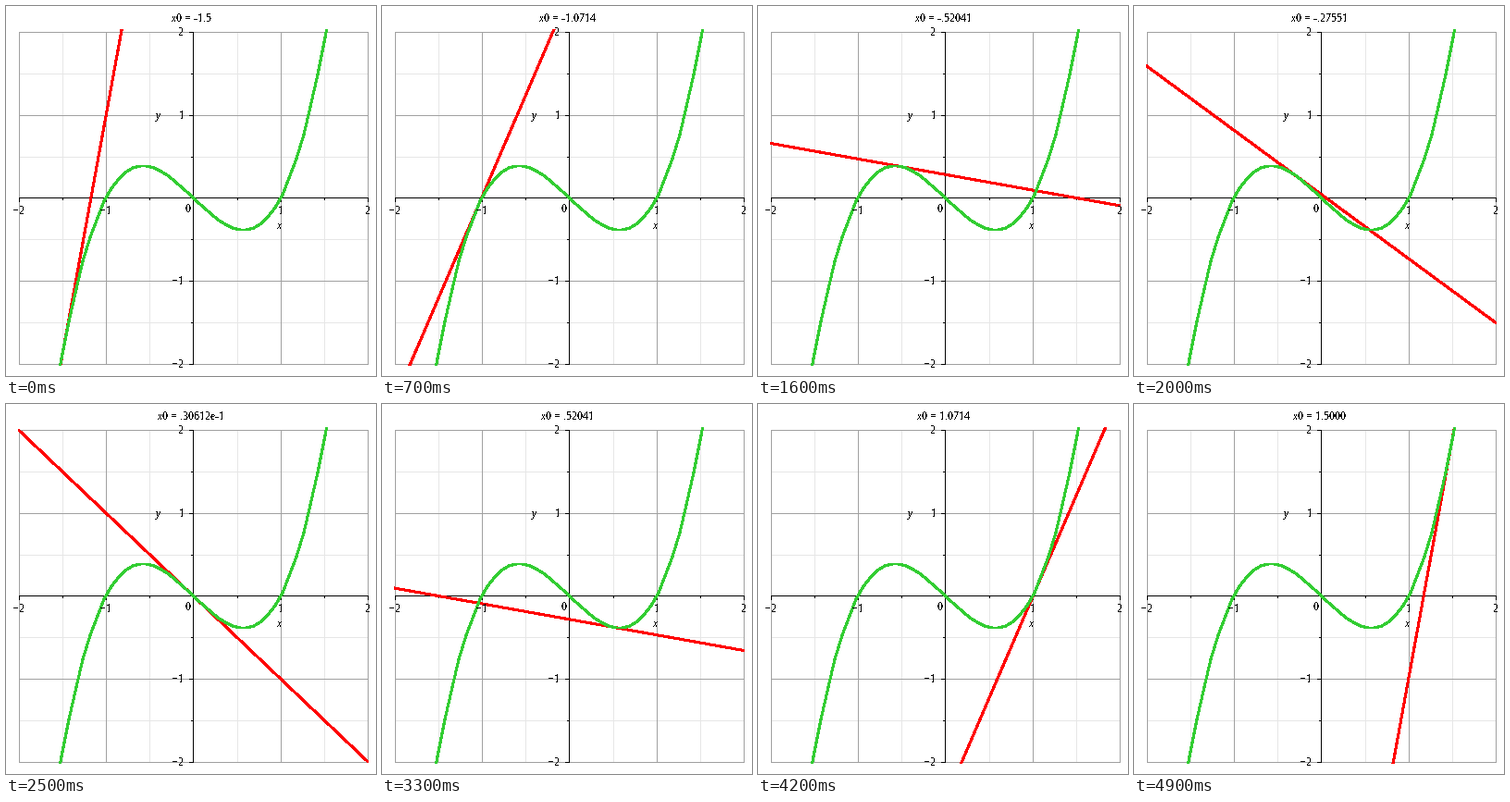
Recreate the animation shown at these times as a matplotlib script. Size 400x400 px, loop 5000 ms.

```python
import numpy as np
import matplotlib.pyplot as plt
from matplotlib.animation import FuncAnimation
from matplotlib.patches import Rectangle

SIZE, DPI, FRAMES = 400, 100, 50
PX = 72 / DPI  # points per pixel
LEFT, RIGHT, TOP, BOTTOM = 14, 391, 28, 387
GREEN, RED = "#32cd32", "#ff0000"

plt.rcParams.update({
    "font.family": "Liberation Serif",
    "text.antialiased": False,
    "text.hinting": "native",
    "text.hinting_factor": 1,
})

fig = plt.figure(figsize=(SIZE / DPI, SIZE / DPI), dpi=DPI, facecolor="white")
ax = fig.add_axes([0, 0, 1, 1])
ax.set_xlim(0, SIZE)
ax.set_ylim(SIZE, 0)
ax.axis("off")


def to_px(x):
    return LEFT + (np.asarray(x) + 2) * (RIGHT - LEFT) / 4


def to_py(y):
    return BOTTOM - (np.asarray(y) + 2) * (BOTTOM - TOP) / 4


def column(x):
    return np.ceil(to_px(x) - 0.5)


def row(y):
    return np.ceil(to_py(y) - 0.5)


def hairline(x0, y0, x1, y1, color):
    """One-pixel line covering both end pixels."""
    ax.plot([x0 + 0.5, x1 + 0.5], [y0 + 0.5, y1 + 0.5], color=color, lw=PX,
            snap=False, solid_capstyle="projecting")


def label(x, y, text, ha="center", **kw):
    return ax.text(x, y, text, fontsize=12 * PX, ha=ha, va="baseline",
                   zorder=5, **kw)


def f(x):
    return x ** 3 - x


# Grid: minor lines first, then unit lines
halves = np.arange(-2, 2.1, 0.5)
for ticks, color in ((halves[1::2], "#e6e6e6"), (halves[::2], "#a0a0a0")):
    for t in ticks:
        hairline(column(t), TOP, column(t), BOTTOM, color)
        hairline(LEFT, row(t), RIGHT, row(t), color)

# Axes with ticks
axis_x, axis_y = column(0), row(0)
hairline(axis_x, TOP, axis_x, BOTTOM, "black")
hairline(LEFT, axis_y, RIGHT, axis_y, "black")
for t in halves:
    size = 4 if t == int(t) else 2
    hairline(column(t), axis_y, column(t), axis_y + size, "black")
    hairline(axis_x - size, row(t), axis_x, row(t), "black")

for t in (-2, -1, 1, 2):
    text = str(t).replace("-", "\u2212")
    label(column(t), 225, text)
    label(192.5, row(t) + 4, text, ha="right")
label(196.5, 223, "0")
label(296, 241, "x", style="italic")
label(164.5, 122, "y", style="italic")
title = label(200.5, 17, "")

# Curves may overshoot the grid slightly
window = Rectangle((13, 25), 379, 364, transform=ax.transData)
line_style = dict(lw=2 * PX, antialiased=False, snap=False,
                  solid_capstyle="projecting")
xs = np.linspace(-2, 2, 50)
tangent, = ax.plot([], [], color=RED, zorder=3, **line_style)
curve, = ax.plot(np.round(to_px(xs)), np.round(to_py(f(xs))), color=GREEN,
                 zorder=4, **line_style)
for line in (tangent, curve):
    line.set_clip_path(window)


def five_digits(x):
    """Five significant digits, without a leading zero."""
    if abs(x) >= 1:
        return f"{x:.4f}"
    if abs(x) >= 0.1:
        return f"{x:.5f}".replace("0.", ".", 1)
    return f"{x * 10:.5f}".replace("0.", ".", 1) + "e-1"


def update(i):
    x0 = -1.5 + 3 * i / (FRAMES - 1)
    ends = np.array([-2, 2])
    tangent.set_data(to_px(ends), to_py(f(x0) + (3 * x0 ** 2 - 1) * (ends - x0)))
    title.set_text("x0 = " + (five_digits(x0) if i else "-1.5"))
    return tangent, title


anim = FuncAnimation(fig, update, frames=FRAMES, interval=100, repeat=True,
                     repeat_delay=0, blit=False)
plt.show()
```
